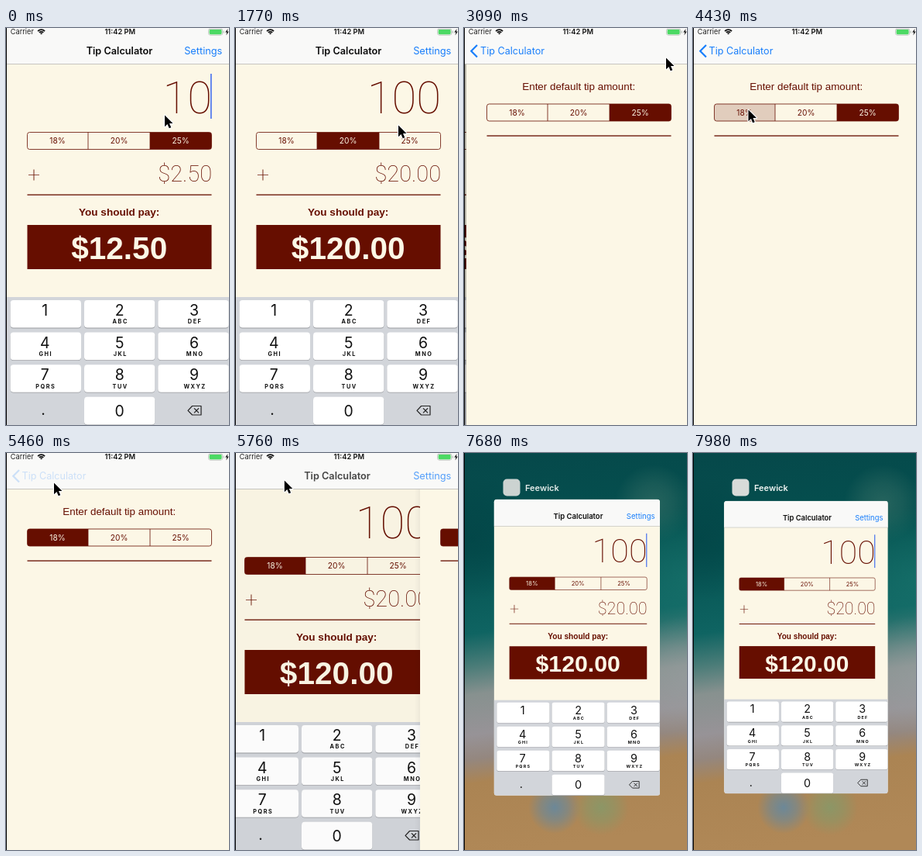
An HTML page with a canvas that plays this animation: 288x512 px, repeating every 8000 ms.

```html
<!DOCTYPE html>
<html lang="en">
<head>
<meta charset="utf-8">
<title>Tip Calculator</title>
<style>
html, body { margin: 0; width: 100%; height: 100%; overflow: hidden; background: #000; }
canvas { display: block; width: 288px; height: 512px; }
</style>
</head>
<body>
<canvas id="stage" width="288" height="512"></canvas>
<script>
const ctx = document.getElementById('stage').getContext('2d');
const LOOP = 8000, STEP = 147.6;
const W = 288, H = 512;
const BROWN = '#660e00', CREAM = '#fcf7e6', BLUE = '#187efb', BAR = '#f9f9f8';
const UI = 'Inter, sans-serif';
const SANS = '"Liberation Sans", sans-serif';
const THIN = 'Roboto, sans-serif';

// Pointer path: step, x, y
const PATH = [
  [0, 204.5, 112], [4, 204, 116], [7, 164, 138], [8, 163, 139], [12, 210.5, 125],
  [14, 255, 16], [16, 260.5, 24], [18, 260.5, 38], [21, 260.5, 38], [24, 220, 90],
  [28, 78, 104], [30, 71, 105], [32, 71, 107], [36, 61.5, 38], [37, 61.5, 38],
  [40, 64, 34], [43, 71, 38]
];

const mix = (a, b, k) => a + (b - a) * k;
const clamp = v => Math.max(0, Math.min(1, v));
// Critically damped spring: what is left of the way after d
const rest = d => d < 0 ? 1 : (1 + d) * Math.exp(-d);

function text(str, x, y, font, color, align = 'left', gap = 0) {
  ctx.font = font;
  ctx.fillStyle = color;
  ctx.textAlign = align;
  ctx.letterSpacing = gap + 'px';
  ctx.fillText(str, x, y);
}

function rect(x, y, w, h, color) {
  ctx.fillStyle = color;
  ctx.fillRect(x, y, w, h);
}

function round(x, y, w, h, r, color) {
  ctx.fillStyle = color;
  ctx.beginPath();
  ctx.roundRect(x, y, w, h, r);
  ctx.fill();
}

function line(points, color, width, close) {
  ctx.beginPath();
  points.forEach(([x, y]) => ctx.lineTo(x, y));
  if (close) ctx.closePath();
  ctx.strokeStyle = color;
  ctx.lineWidth = width;
  ctx.stroke();
}

function faded(alpha, draw) {
  if (alpha <= 0) return;
  ctx.save();
  ctx.globalAlpha *= clamp(alpha);
  draw();
  ctx.restore();
}

function segments(y, chosen, pressed) {
  const edges = [27.5, 106, 186, 265.5];
  ctx.save();
  ctx.beginPath();
  ctx.roundRect(27.5, y, 238, 22, 3);
  ctx.clip();
  for (let i = 0; i < 3; i++) {
    const x = edges[i], w = edges[i + 1] - x;
    if (i === chosen) rect(x, y, w, 22, BROWN);
    else if (i === pressed) rect(x, y, w, 22, 'rgba(102,14,0,.18)');
  }
  ctx.restore();
  ctx.beginPath();
  ctx.roundRect(27.5, y, 238, 22, 3);
  ctx.strokeStyle = BROWN;
  ctx.lineWidth = 0.8;
  ctx.stroke();
  [106, 186].forEach(x => line([[x, y], [x, y + 22]], BROWN, 0.8));
  ['18%', '20%', '25%'].forEach((s, i) =>
    text(s, 66.5 + i * 79.6, y + 14.8, '10.2px ' + UI, i === chosen ? CREAM : BROWN, 'center'));
}

function keyboard() {
  const letters = ['', 'ABC', 'DEF', 'GHI', 'JKL', 'MNO', 'PQRS', 'TUV', 'WXYZ'];
  rect(0, 347, W, 165, '#d2d5da');
  const key = (col, row) => {
    const x = 5.7 + col * 95.3, y = 351 + row * 41.6;
    round(x, y + 0.8, 91.3, 35.6, 4, '#999ba0');
    round(x, y, 91.3, 35.6, 4, '#fff');
  };
  for (let i = 0; i < 9; i++) {
    const col = i % 3, row = Math.floor(i / 3);
    const x = 50.3 + col * 96.4, y = 371 + row * 41.6;
    key(col, row);
    text(i + 1, x, y, '19.4px ' + UI, '#111', 'center');
    text(letters[i], x + 1, y + 10.3, '700 7.3px ' + UI, '#111', 'center', 1.5);
  }
  key(1, 3);
  text('0', 146.7, 500.5, '19.4px ' + UI, '#111', 'center');
  text('.', 48, 499, '19.4px ' + UI, '#111', 'center');
  ctx.lineJoin = 'round';
  line([[235, 493.3], [240.5, 487.5], [252, 487.5], [252, 499], [240.5, 499]], '#222', 1.2, true);
  line([[243, 490.3], [249, 496.3]], '#222', 1.2);
  line([[249, 490.3], [243, 496.3]], '#222', 1.2);
}

function calculator(n) {
  const bill = n < 3 ? 10 : 100;
  const chosen = n < 7 ? 2 : n < 37 ? 1 : 0;
  const tip = bill * (n < 7 ? 0.25 : 0.2);
  const caret = n < 37 ? n % 7 < 4 : n > 40 && n !== 45;

  rect(0, 0, W, H, CREAM);
  text(bill, 266, 109.5, '250 58px ' + THIN, BROWN, 'right');
  if (caret) rect(264, 59, 1.7, 58, '#4f77ee');
  segments(134.5, chosen, n === 6 ? 1 : -1);
  line([[29, 189.5], [43, 189.5]], BROWN, 0.7);
  line([[36, 182.5], [36, 196.5]], BROWN, 0.9);
  text('$' + tip.toFixed(2), 266, 198.3, '250 29px ' + THIN, BROWN, 'right');
  rect(27.5, 214.5, 238, 1.3, BROWN);
  text('You should pay:', 146.2, 241.5, 'bold 13.55px ' + SANS, BROWN, 'center');
  rect(27.5, 254, 238, 57, BROWN);
  text('$' + (bill + tip).toFixed(2), 146.2, 298, 'bold 40.6px ' + SANS, CREAM, 'center');
  keyboard();
}

function settings(n) {
  rect(1, 0, W, H, CREAM);
  text('Enter default tip amount:', 146.2, 79.5, '13.4px ' + SANS, BROWN, 'center');
  segments(98, n < 31 ? 2 : 0, n === 29 || n === 30 ? 0 : -1);
  rect(27.5, 138.4, 238, 1.3, BROWN);
}

function navBar(n, q) {
  rect(0, 0, W, 46.3, BAR);
  rect(0, 46, W, 0.8, '#b9b9b6');
  const x = mix(146.5, 62, q);
  faded(1 - 1.4 * q, () => text('Tip Calculator', x, 34.2, '600 12.7px ' + UI, '#0c0c0c', 'center'));
  faded(n === 17 ? 0.2 : 1 - 1.6 * q, () =>
    text('Settings', 279.3, 34.2, '12.75px ' + UI, BLUE, 'right'));
  faded(n === 36 || n === 37 ? 0.2 : 1.4 * q - 0.4, () => {
    text('Tip Calculator', x, 34.2, '12.6px ' + UI, BLUE, 'center');
    ctx.lineJoin = 'miter';
    line([[17, 22], [9.3, 29.8], [17, 37.6]], BLUE, 2.2);
  });
}

function statusBar() {
  text('Carrier', 5.8, 8.3, '9.2px ' + UI, '#222');
  text('11:42 PM', 147.3, 8.3, '600 9.3px ' + UI, '#111', 'center');
  [1.3, 3.8, 6.4].forEach(r => {
    ctx.beginPath();
    ctx.arc(45.6, 8.6, r, -Math.PI * 0.75, -Math.PI * 0.25);
    ctx.strokeStyle = '#111';
    ctx.lineWidth = 1.7;
    ctx.stroke();
  });
  round(261.3, 0.8, 18.6, 8.6, 2.4, '#a9b3aa');
  round(261.9, 1.4, 17.4, 7.4, 1.9, BAR);
  round(262.6, 2, 16, 6.2, 1.4, '#4cd964');
  rect(280.6, 3.6, 1, 3, '#a9b3aa');
  ctx.fillStyle = '#111';
  ctx.beginPath();
  [[286.6, 1], [283.2, 5.6], [285.3, 5.6], [284.4, 9.4], [287.7, 4.6], [285.7, 4.6]]
    .forEach(p => ctx.lineTo(...p));
  ctx.fill();
}

function phone(n, barAlpha) {
  const push = 1 - rest(2 * (n - 17.4)), pop = rest(2 * (n - 37.4));
  const q = n < 30 ? push : pop;
  const shift = Math.round(287 * (1 - q));
  if (shift > 0) {
    ctx.save();
    ctx.translate(-Math.round(86 * q), 0);
    calculator(n);
    ctx.restore();
    // The part uncovered on the right by the parallax
    const gap = Math.round(86 * q);
    if (gap) rect(W - gap, 0, gap, H, CREAM);
    rect(0, 0, W, H, `rgba(0,0,0,${0.1 * q})`);
  }
  if (q > 0.002) {
    if (shift > 0) {
      const g = ctx.createLinearGradient(shift - 6, 0, shift + 1, 0);
      g.addColorStop(0, 'rgba(0,0,0,0)');
      g.addColorStop(1, `rgba(0,0,0,${0.25 * q})`);
      rect(shift - 6, 0, 7, H, g);
    }
    ctx.save();
    ctx.translate(shift, 0);
    settings(n);
    ctx.restore();
  }
  navBar(n, q);
  faded(barAlpha, statusBar);
}

function glow(x, y, r, rgb, alpha) {
  const g = ctx.createRadialGradient(x, y, 0, x, y, r);
  g.addColorStop(0, `rgba(${rgb},${alpha})`);
  g.addColorStop(0.5, `rgba(${rgb},${alpha * 0.6})`);
  g.addColorStop(1, `rgba(${rgb},0)`);
  rect(x - r, y - r, 2 * r, 2 * r, g);
}

function wallpaper() {
  const g = ctx.createLinearGradient(0, 0, 70, H);
  [[0, '#06484a'], [0.25, '#045150'], [0.45, '#0f6462'], [0.53, '#4a7c78'],
   [0.6, '#87918f'], [0.7, '#979397'], [0.76, '#94877f'], [0.82, '#ab8453'],
   [1, '#b08857']]
    .forEach(([k, c]) => g.addColorStop(k, c));
  rect(0, 0, W, H, g);
  glow(245, 65, 50, '70,120,108', 0.5);
  glow(285, 160, 90, '30,125,115', 0.45);
  glow(10, 110, 80, '0,58,62', 0.4);
  glow(288, 290, 80, '155,162,164', 0.5);
  glow(117, 457, 34, '108,136,152', 1);
  glow(177, 457, 36, '140,150,102', 1);
}

function switcher(n) {
  const p = 1 - rest(1.5 * (n - 48.6));
  const s = mix(1, 0.7365, p);
  wallpaper();
  faded(p * 1.6 - 0.6, () => {
    round(50.5, 33.5, 22, 22, 5, '#d9dcda');
    text('Feewick', 79, 48.6, '600 11px ' + UI, '#f1f5f3');
  });
  ctx.save();
  ctx.translate(mix(1, 40.3, p) - s, 62 * p);
  ctx.scale(s, s);
  ctx.beginPath();
  ctx.roundRect(1, 0, 287, H, 5 * p);
  ctx.clip();
  phone(n, 1 - 3 * p);
  ctx.restore();
}

function pointer(n) {
  let i = 0;
  while (i < PATH.length - 2 && n > PATH[i + 1][0]) i++;
  const [n0, x0, y0] = PATH[i], [n1, x1, y1] = PATH[i + 1];
  let k = clamp((n - n0) / (n1 - n0));
  k = k * k * (3 - 2 * k);
  ctx.save();
  ctx.translate(mix(x0, x1, k), mix(y0, y1, k));
  ctx.beginPath();
  [[0.5, 0.5], [0.5, 15.2], [4, 12], [6.2, 17.3], [8.8, 16.2], [6.5, 11], [11, 11]]
    .forEach(c => ctx.lineTo(...c));
  ctx.closePath();
  ctx.lineJoin = 'round';
  ctx.strokeStyle = '#fff';
  ctx.lineWidth = 2.2;
  ctx.stroke();
  ctx.fillStyle = '#000';
  ctx.fill();
  ctx.restore();
}

const start = performance.now();

function frame() {
  const t = (performance.now() - start) % LOOP;
  const n = Math.floor((t + 12) / STEP);
  if (n < 49) {
    phone(n, 1);
    pointer(n);
  } else {
    switcher(n);
  }
  rect(0, 0, 1, H, '#000');
  requestAnimationFrame(frame);
}
frame();
</script>
</body>
</html>
```
